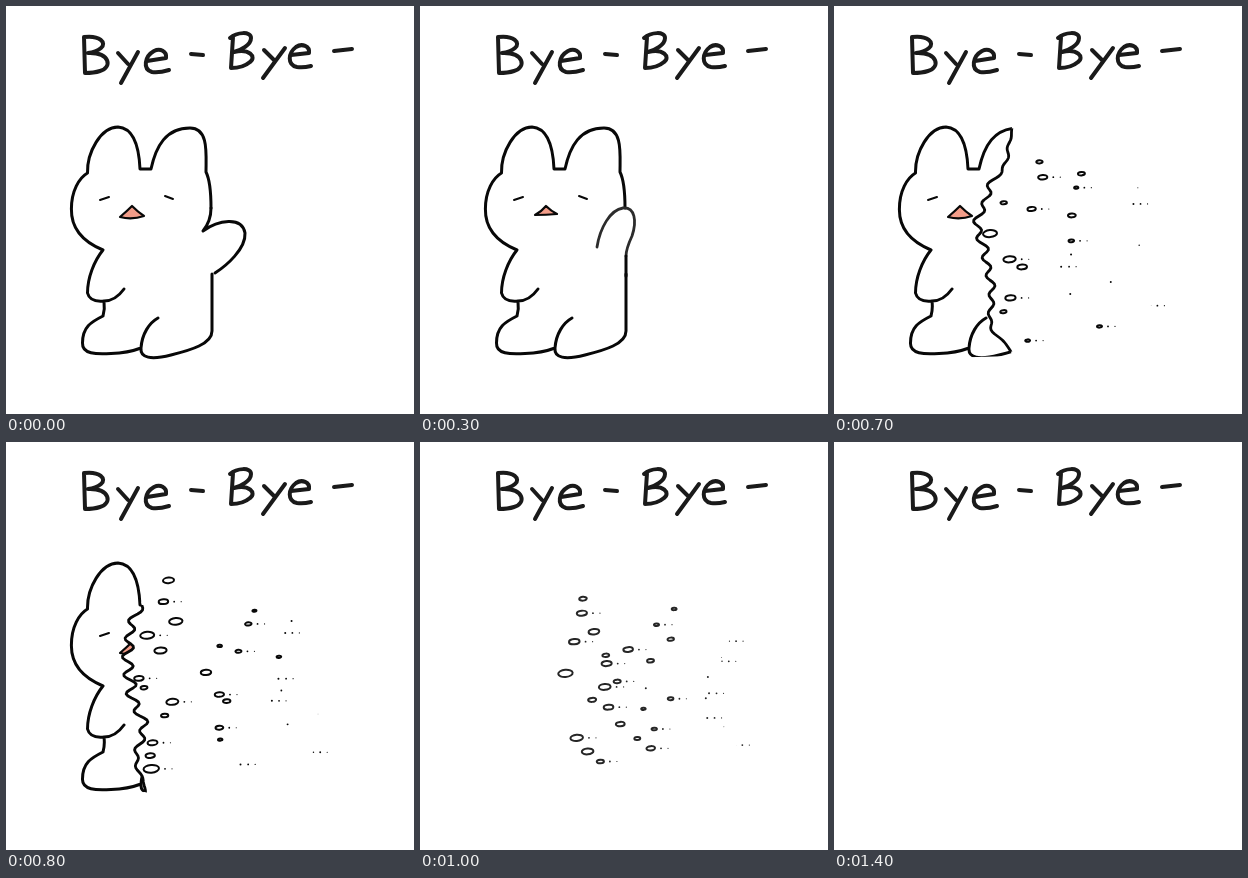
Animation, 408 px wide and 408 px high, one loop 1.9 s. Source, as an HTML page with a canvas:

```html
<!DOCTYPE html>
<html lang="en">
<head>
<meta charset="utf-8">
<title>Bye-Bye</title>
<style>
html, body { margin: 0; width: 100%; height: 100%; overflow: hidden; background: #fff; }
canvas { display: block; width: 408px; height: 408px; }
</style>
</head>
<body>
<canvas id="stage" width="408" height="408" aria-label="Bye - Bye -"></canvas>
<script>
const ctx = document.getElementById('stage').getContext('2d');
const INK = '#080808';
const STEP = 100, LOOP = 1900;
const CRUMBLE = 5, GONE = 10, CLEAR = 14;   // steps
const TOP = 120, BOTTOM = 350;              // extent of the rabbit

const lettering = new Path2D(`
  M78 31L79 67M78 31C94 29 101 37 95 42Q90 46 82 47C105 46 106 62 94 65Q88 67 79 67
  M112 47L122 58M132 46L115 77
  M141 55L160 52C161 45 154 42 148 45C139 50 136 63 146 66Q153 67 163 64
  M185 48L197 49
  M227 31L225 62M224 32C231 26 245 25 245 32C245 39 235 44 228 46C243 42 251 51 244 56Q237 62 225 62
  M258 44L268 54M279 42L257 72
  M285 49L303 47C304 40 296 37 290 41C282 47 281 59 291 61Q297 62 305 60
  M328 45L346 43`);

const head = `M97 244C80 237 65 225 65.4 203C65.4 185 73 172 81.5 167
  C81 146 95 121 112 121C127 122 133 140 134 163L145 163
  C150 140 160 122 184 122C203 122 200 148 200 166C204 174 205 190 205 202`;
const trunk = `206 268L206 325C206 338 185 344 165 349C145 354 134 352 135 342
  Q122 347 105 347.5C90 348.5 76 348 76.5 337C76.5 321 85 316 97 310Q99 303 98 295
  C88 296 83 293 81.5 287C81.5 272 88 255 97 244`;
const folds = 'M152 312C143 317 136 328 135 342M98 295C106 295 113 290 118 283';
const outline = new Path2D(head + 'M' + trunk + folds);
const silhouette = new Path2D(head + 'L' + trunk);

const armOut = new Path2D('M205 202Q205 215 197 225C212 214 236 210 239 227C240 243 220 260 209 267');
const armUp = new Path2D('M177 241C180 222 190 204 203 202C215 201 217 215 212 230Q206 243 206 250');
const flank = new Path2D('M206 250V270');
const eyes = new Path2D('M94 194L103 191M159 190L167 193');
const mouthOpen = new Path2D('M114 211Q121 205 126 200Q132 206 138 210Q126 214 114 211Z');
const mouthShut = new Path2D('M115 209Q122 205 126 200Q131 205 137 208Q126 209 115 209Z');

// Crumbling edge, two steps apart: x at even heights, and size of the ripple
const edges = [
  { xs: [199, 200, 200, 198, 198, 196, 199, 203], ripple: 3 },
  { xs: [178, 173, 154, 143, 152, 158, 156, 178], ripple: 4 },
  { xs: [112, 107, 95, 100, 99, 118, 104, 101], ripple: 7 }
];

const rand = seed => {
  const v = Math.sin(seed * 12.9898) * 43758.5453;
  return v - Math.floor(v);
};
const lerp = (a, b, t) => a + (b - a) * t;

function edgeX(step, y) {
  const phase = (step - CRUMBLE) / 2, stage = Math.floor(phase);
  const from = edges[stage], to = edges[Math.min(stage + 1, 2)], mix = phase - stage;
  const t = (y - TOP) / (BOTTOM - TOP), pos = Math.min(t * 7, 6.999), i = Math.floor(pos);
  const ease = (1 - Math.cos(Math.PI * (pos - i))) / 2;
  const base = ({ xs }) => lerp(xs[i], xs[i + 1], ease);
  const ripple = lerp(from.ripple, to.ripple, mix) * Math.sin(Math.PI * t);
  return lerp(base(from), base(to), mix) + ripple * Math.cos((y - 187) * .34);
}

function edgePath(step) {
  const path = new Path2D();
  for (let y = TOP; y <= BOTTOM; y += 2) path.lineTo(edgeX(step, y), y);
  return path;
}

function stroke(path, width, color = INK) {
  ctx.lineWidth = width;
  ctx.strokeStyle = color;
  ctx.stroke(path);
}

function drawRabbit(step) {
  const edge = step >= CRUMBLE && edgePath(step);
  const open = step % 2 === 0 || step === 7;
  ctx.save();
  if (edge) {
    const kept = new Path2D(edge);
    kept.lineTo(0, BOTTOM + 5);
    kept.lineTo(0, TOP - 5);
    kept.lineTo(edgeX(step, TOP), TOP - 5);
    ctx.clip(kept);
  }
  stroke(outline, 3);
  if (open && !edge) stroke(armOut, 3);
  else {
    stroke(armUp, 2.8, '#2c2c2c');
    stroke(flank, 3);
  }
  if (step < 9) {
    const mouth = open ? mouthOpen : mouthShut;
    stroke(eyes, 2);
    ctx.fillStyle = '#f39d89';
    ctx.fill(mouth);
    stroke(mouth, 2.2);
  }
  ctx.restore();
  if (edge) {
    ctx.save();
    ctx.clip(silhouette);
    stroke(edge, 2.8);
    ctx.restore();
  }
}

function drawBubble(x, y, r, color) {
  const bubble = new Path2D();
  if (r < 2) {
    bubble.arc(x, y, Math.min(r, 1), 0, 7);
    ctx.fillStyle = color;
    ctx.fill(bubble);
  } else {
    bubble.ellipse(x, y, r, r * .5, -.08, 0, 7);
    stroke(bubble, 2, color);
  }
}

// Crumbs break off the edge on each step, drift right, draw together and shrink
function drawCrumbs(step) {
  const shade = Math.max(0, step - 9) * 30 + 8;
  const color = `rgb(${shade} ${shade} ${shade})`;
  for (let born = CRUMBLE; born <= Math.min(step, 9); born++) {
    const count = 2 * born - 4, age = step - born;
    for (let k = 0; k < count; k++) {
      const seed = born * 100 + k * 4;
      const startY = 138 + (k + rand(seed)) * 198 / count;
      const x = edgeX(born, startY) + 10 + 40 * rand(seed + 1) ** 1.5 + age * (32 + 14 * rand(seed + 2));
      const y = 248 + (startY - 248) * .86 ** age;
      const size = Math.min(1, (325 - x) / 170);
      if (size <= 0) continue;
      const r = (3 + 5 * rand(seed + 3)) * size;
      drawBubble(x, y, r, color);
      if (k % 2) for (let dot = 0; dot < 2; dot++) drawBubble(x + r + 6 + dot * 7, y, .9 - dot * .3, color);
    }
  }
}

function draw(now) {
  const step = Math.floor(now % LOOP / STEP);
  ctx.fillStyle = '#fff';
  ctx.fillRect(0, 0, 408, 408);
  ctx.lineCap = ctx.lineJoin = 'round';
  stroke(lettering, 4, '#1a1a1a');
  if (step < GONE) drawRabbit(step);
  if (step >= CRUMBLE && step < CLEAR) drawCrumbs(step);
}

const start = performance.now();
function tick() {
  draw(performance.now() - start);
  requestAnimationFrame(tick);
}
tick();
</script>
</body>
</html>
```
